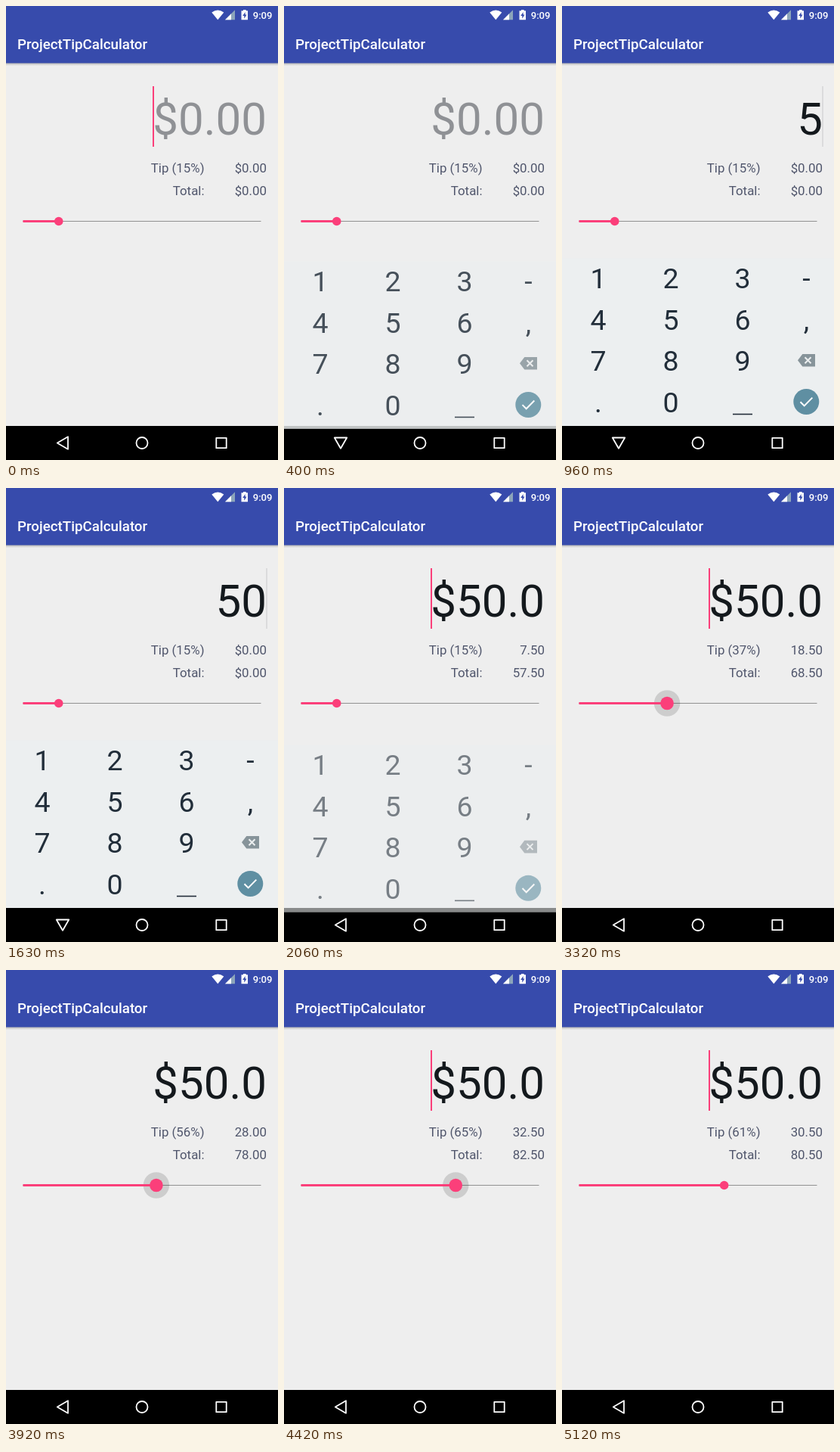
Animation of 360 by 600 pixels, one loop 5.39 s. Source, as an HTML page:

```html
<!DOCTYPE html>
<html lang="en">
<head>
<meta charset="utf-8">
<title>Tip calculator</title>
<style>
  html, body { margin: 0; width: 100%; height: 100%; overflow: hidden; background: #eee; }
  svg { display: block; width: 100vw; height: 100vh; font-family: Roboto, sans-serif; }
  .row { font-size: 16.875px; fill: #50566c; text-anchor: end; }
  .key { font-size: 37.5px; fill: #222e3a; text-anchor: middle; }
  .icon { fill: none; stroke: #fff; stroke-width: 1.8; stroke-linejoin: round; }
</style>
</head>
<body>
<svg viewBox="0 0 360 600">
  <defs>
    <linearGradient id="shade" x2="0" y2="1">
      <stop stop-color="#000" stop-opacity=".26"/>
      <stop offset="1" stop-color="#000" stop-opacity="0"/>
    </linearGradient>
  </defs>
  <rect width="360" height="600" fill="#eee"/>
  <rect y="75" width="360" height="4" fill="url(#shade)"/>
  <rect width="360" height="75.5" fill="#374bac"/>

  <g fill="#fff">
    <path d="M272.3 8.4Q280.3 2.4 288.3 8.4L280.3 18.3Z"/>
    <path d="M290 18.3L303 5.3V18.3Z" fill="#8ca5ba"/>
    <path d="M290 18.3L298 10.3V18.3Z"/>
    <path d="M314 5H317.6V6.3H320V18.3H311.5V6.3H314Z"/>
    <path d="M316.6 8L313.2 13H315.3V16.7L318.5 11.6H316.6Z" fill="#374bac"/>
    <text x="352.5" y="17" font-size="13.1" font-weight="500" text-anchor="end">9:09</text>
    <text x="15" y="57" font-size="18.75" font-weight="500">ProjectTipCalculator</text>
  </g>

  <text id="amount" x="345" y="170" font-size="60" text-anchor="end"></text>
  <rect id="cursor" y="106" height="80"/>
  <text id="label" class="row" x="262.5" y="219.5"></text>
  <text id="tip" class="row" x="345" y="219.5"></text>
  <text class="row" x="262.5" y="250">Total:</text>
  <text id="total" class="row" x="345" y="250"></text>

  <path d="M22.5 284.5H337.5" stroke="#919191"/>
  <circle id="halo" cy="284.5" fill="#000" fill-opacity=".14"/>
  <path id="bar" stroke="#fb3f7a" stroke-width="3"/>
  <circle id="thumb" cy="284.5" fill="#fb3f7a"/>

  <rect y="555" width="360" height="45" fill="#000"/>
  <g id="keyboard">
    <rect y="333.5" width="360" height="221.5" fill="#eceff0"/>
    <rect y="555" width="360" height="45" fill="#000"/>
    <g id="keys"></g>
    <path d="M226 539.5H252" stroke="#222e3a" stroke-width="1.6"/>
    <path d="M312 468.3L318.3 460H335V476.6H318.3Z" fill="#87949a"/>
    <path d="M321.5 464.3L329.5 472.3M329.5 464.3L321.5 472.3" stroke="#eceff0" stroke-width="2"/>
    <circle cx="323.3" cy="523" r="17" fill="#5f8fa2"/>
    <path d="M315.5 523.2L320.7 528.4L331.3 517.6" fill="none" stroke="#fff" stroke-width="2"/>
  </g>

  <g class="icon">
    <path id="back" d="M67.8 577.5L82 569.3V585.7Z"/>
    <circle cx="180" cy="577.5" r="7.5"/>
    <rect x="278.3" y="570.8" width="13.4" height="13.4"/>
  </g>
</svg>
<script>
const LOOP = 5390;
const $ = id => document.getElementById(id);
const set = (id, attrs) => {
  for (const k in attrs) $(id).setAttribute(k, attrs[k]);
};
const write = (id, text) => {
  if ($(id).textContent !== text) $(id).textContent = text;
};
const ramp = (t, from, to) => Math.min(1, Math.max(0, (t - from) / (to - from)));

const columns = [48, 144, 239, 323.5];
['123-', '456,', '789', '.0'].forEach((row, r) => {
  [...row].forEach((char, c) => {
    const key = document.createElementNS('http://www.w3.org/2000/svg', 'text');
    key.setAttribute('class', 'key');
    key.setAttribute('x', columns[c]);
    key.setAttribute('y', 373 + r * 54.7);
    key.textContent = char;
    $('keys').append(key);
  });
});

// Slider percentage along the drag: [time, percent]
const drag = [[2720, 15], [3320, 37], [3920, 56], [4330, 66], [4800, 61]];
function percentAt(t) {
  let p = drag[0][1];
  for (let i = 1; i < drag.length; i++) {
    p += (drag[i][1] - drag[i - 1][1]) * ramp(t, drag[i - 1][0], drag[i][0]);
  }
  return Math.round(p);
}

const TYPE_5 = 830, TYPE_0 = 1130, DONE = 1960;

function drawAmount(t) {
  const typing = t >= TYPE_5 && t < DONE;
  write('amount', t < TYPE_5 ? '$0.00' : t < TYPE_0 ? '5' : t < DONE ? '50' : '$50.0');
  set('amount', { fill: t < TYPE_5 ? '#8f9195' : '#14191d' });

  const blink = t < DONE ? t < 130 || t >= 630 : (t + 40) % 1000 < 500;
  set('cursor', {
    x: typing ? 344.5 : 194,
    width: typing ? 1 : 2,
    fill: typing ? '#c8c8ca' : '#fb3f7a',
    opacity: typing || blink ? 1 : 0
  });
}

function drawSlider(t) {
  const percent = percentAt(t);
  const x = 22.5 + 3.15 * percent;
  const press = ramp(t, 2660, 2840) * (1 - ramp(t, 4900, 5110));
  set('bar', { d: `M22.5 284.5H${x}` });
  set('thumb', { cx: x, r: 5.8 + 3 * press });
  set('halo', { cx: x, r: 17.2 * ramp(t, 2660, 2840), opacity: press });

  const tip = percent / 2;
  write('label', `Tip (${percent}%)`);
  write('tip', t < DONE ? '$0.00' : tip.toFixed(2));
  write('total', t < DONE ? '$0.00' : (50 + tip).toFixed(2));
}

function drawKeyboard(t) {
  const enter = ramp(t, 290, 610), exit = ramp(t, DONE, 2200);
  const dy = 33 * ((1 - enter) ** 5 + exit ** 2);
  set('keyboard', {
    transform: `translate(0 ${dy})`,
    opacity: (1 - (1 - enter) ** 4) * (1 - exit)
  });
  set('back', { transform: `rotate(${t >= 340 && t < 2000 ? -90 : 0} 75 577.5)` });
}

function frame(now) {
  const t = now % LOOP;
  drawAmount(t);
  drawSlider(t);
  drawKeyboard(t);
  requestAnimationFrame(frame);
}
const start = performance.now();
const tick = frame;
frame(0);
</script>
</body>
</html>
```
